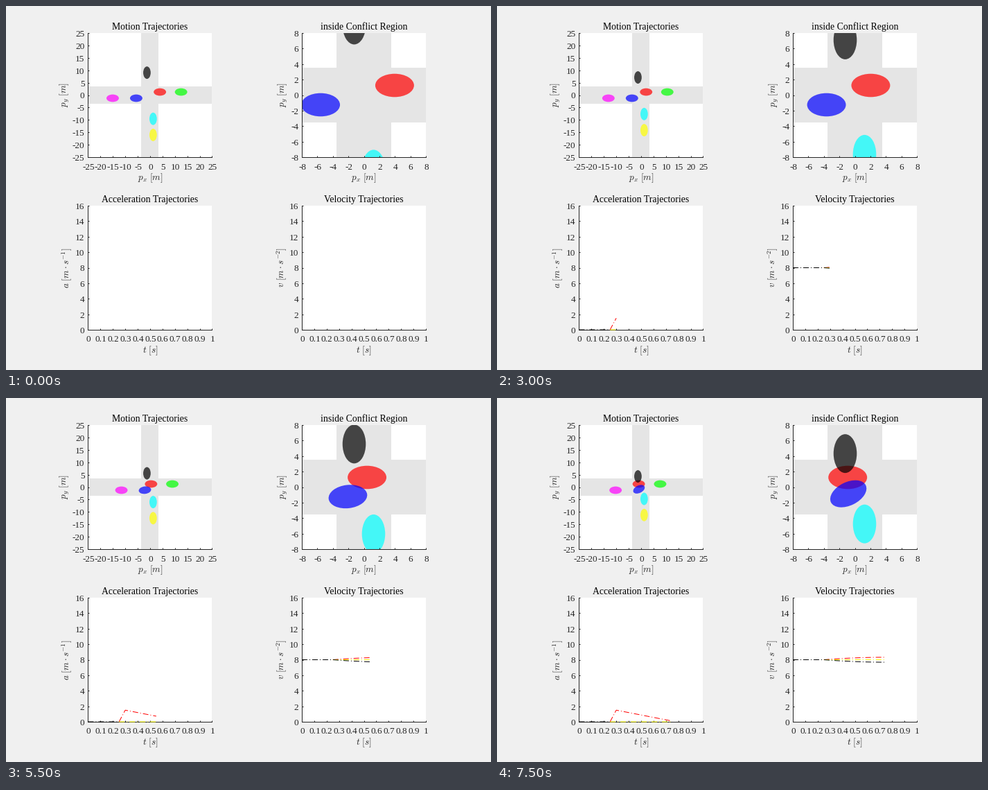
Animation, 700 px wide and 525 px high, one loop 8 s. Source, as a matplotlib script:

```python
import matplotlib.pyplot as plt
import numpy as np
from matplotlib.animation import FuncAnimation
from matplotlib.patches import Ellipse, Rectangle

W, H, DPI = 700, 525, 100
PX = 72 / DPI            # one pixel in points
SIDE = 179               # plot size in pixels
INK = "#262626"
FRAMES, STEP_MS = 16, 500
DT, MOVE_DT = 0.05, 0.04  # plotted and simulated time per step
ONSET = 5                 # step at which the speeds part
LANE, ROAD, TURN_R = 1.25, 3.5, 3.75

plt.rcParams["mathtext.fontset"] = "cm"
plt.rcParams["font.family"] = "Liberation Serif"
fig = plt.figure(figsize=(W / DPI, H / DPI), dpi=DPI, facecolor="#f0f0f0")


def label(x, y, s, size=13.3, color=INK, **kw):
    kw = {"ha": "center", "va": "baseline", **kw}
    fig.text(x / W, 1 - y / H, s, fontsize=size * PX, color=color, **kw)


def panel(x0, y0, title, xlabel, ylabel, ylabel_x, xlim, ylim, xticks, yticks):
    ax = fig.add_axes([x0 / W, 1 - (y0 + SIDE) / H, SIDE / W, SIDE / H])
    ax.set(xlim=xlim, ylim=ylim, xticks=xticks, yticks=yticks)
    ax.spines[["top", "right"]].set_visible(False)
    ax.spines[["left", "bottom"]].set(linewidth=PX, color=INK)
    ax.tick_params(direction="in", length=2 * PX, width=PX, color=INK,
                   labelleft=False, labelbottom=False)
    for v in xticks:
        x = x0 + SIDE * (v - xlim[0]) / (xlim[1] - xlim[0])
        label(x + 0.5, y0 + SIDE + 17.5, f"{v:g}")
    for v in yticks:
        y = y0 + SIDE * (ylim[1] - v) / (ylim[1] - ylim[0])
        label(x0 - 5, y + 5, f"{v:g}", ha="right")
    mid = x0 + SIDE / 2
    label(mid, y0 - 5, title, 13.7, "black")
    label(mid, y0 + SIDE + 33.5, xlabel)
    label(ylabel_x, y0 + SIDE / 2, ylabel, rotation=90, rotation_mode="anchor")
    return ax


def map_panel(x0, title, half, ticks, ylabel_x):
    lim = (-half, half)
    ax = panel(x0, 39, title, r"$p_x\ [m]$", r"$p_y\ [m]$", ylabel_x,
               lim, lim, ticks, ticks)
    for w, h in ((half, ROAD), (ROAD, half)):
        ax.add_patch(Rectangle((-w, -h), 2 * w, 2 * h, fc="#e5e5e5", lw=0))
    return ax


def chart_panel(x0, title, ylabel, ylabel_x):
    return panel(x0, 288, title, r"$t\ [s]$", ylabel, ylabel_x, (0, 1), (0, 16),
                 np.arange(11) / 10, range(0, 17, 2))


LEFT, RIGHT = 118.4, 427
overview = map_panel(LEFT, "Motion Trajectories", 25, range(-25, 26, 5), 88)
closeup = map_panel(RIGHT, "inside Conflict Region", 8, range(-8, 9, 2), 403)
acc_ax = chart_panel(LEFT, "Acceleration Trajectories",
                     r"$a\ [m\cdot s^{-1}]$", 91)
vel_ax = chart_panel(RIGHT, "Velocity Trajectories",
                     r"$v\ [m\cdot s^{-2}]$", 401)

# Speed profiles: one car speeds up, one brakes, the rest stay at 8
t = np.arange(FRAMES) * DT
acc = np.interp(t, [0.25, 0.3, 0.75], [0, 1.5, 0.1])
gain = np.cumsum(acc) * MOVE_DT
steady = np.full(FRAMES, 8.0)
fast, slow = steady + gain, steady - gain


def travel(speed):
    return np.concatenate([[0], np.cumsum(speed[1:] * MOVE_DT)])


def straight(x, y, dx, dy, speed=steady):
    d = travel(speed)
    heading = np.full(FRAMES, 90.0 if dy else 0.0)
    return x + dx * d, y + dy * d, heading


def left_turn(x, y, start):
    """Drive right along a lane, then follow a circular arc to the left."""
    s = x + travel(steady)
    angle = np.maximum(s - start, 0) / TURN_R
    return (np.minimum(s, start) + TURN_R * np.sin(angle),
            y + TURN_R * (1 - np.cos(angle)), np.degrees(angle))


both = (overview, closeup)
cars = [
    ("red", both, straight(3.97, LANE, -1, 0, fast)),
    ("lime", (overview,), straight(12.5, LANE, -1, 0)),
    ("blue", both, left_turn(-5.58, -LANE, -2.5)),
    ("magenta", (overview,), straight(-15.07, -LANE, 1, 0)),
    ("cyan", both, straight(LANE, -9.55, 0, 1)),
    ("yellow", (overview,), straight(LANE, -16.05, 0, 1)),
    ("black", both, straight(-LANE, 9.03, 0, -1, slow)),
]

shapes = []
for color, axes, path in cars:
    for ax in axes:
        e = Ellipse((0, 0), 5, 3, fc=color, lw=0, alpha=0.7)
        ax.add_patch(e)
        shapes.append((e, path))


def curve(ax, y, color, first=0):
    line, = ax.plot([], [], color=color, lw=PX, clip_on=False, snap=False,
                    dashes=(8, 3, 1, 3), dash_capstyle="butt", zorder=3)
    return line, y, first


braking = np.where(acc > 0, np.nan, 0)  # negative part lies below the chart
curves = [
    curve(acc_ax, acc, "red", ONSET),
    curve(acc_ax, 0 * t, "yellow", ONSET),
    curve(acc_ax, braking, "black"),
    curve(vel_ax, fast, "red", ONSET),
    curve(vel_ax, steady, "yellow", ONSET),
    curve(vel_ax, slow, "black"),
]


def update(k):
    for e, (x, y, heading) in shapes:
        e.set_center((x[k], y[k]))
        e.set_angle(heading[k])
    n = k + 1 if k else 0
    for line, y, first in curves:
        line.set_data(t[first:n], y[first:n])
    return [e for e, _ in shapes] + [line for line, _, _ in curves]


anim = FuncAnimation(fig, update, frames=FRAMES, init_func=lambda: update(0),
                     interval=STEP_MS, repeat=True, repeat_delay=0)
plt.show()
```
